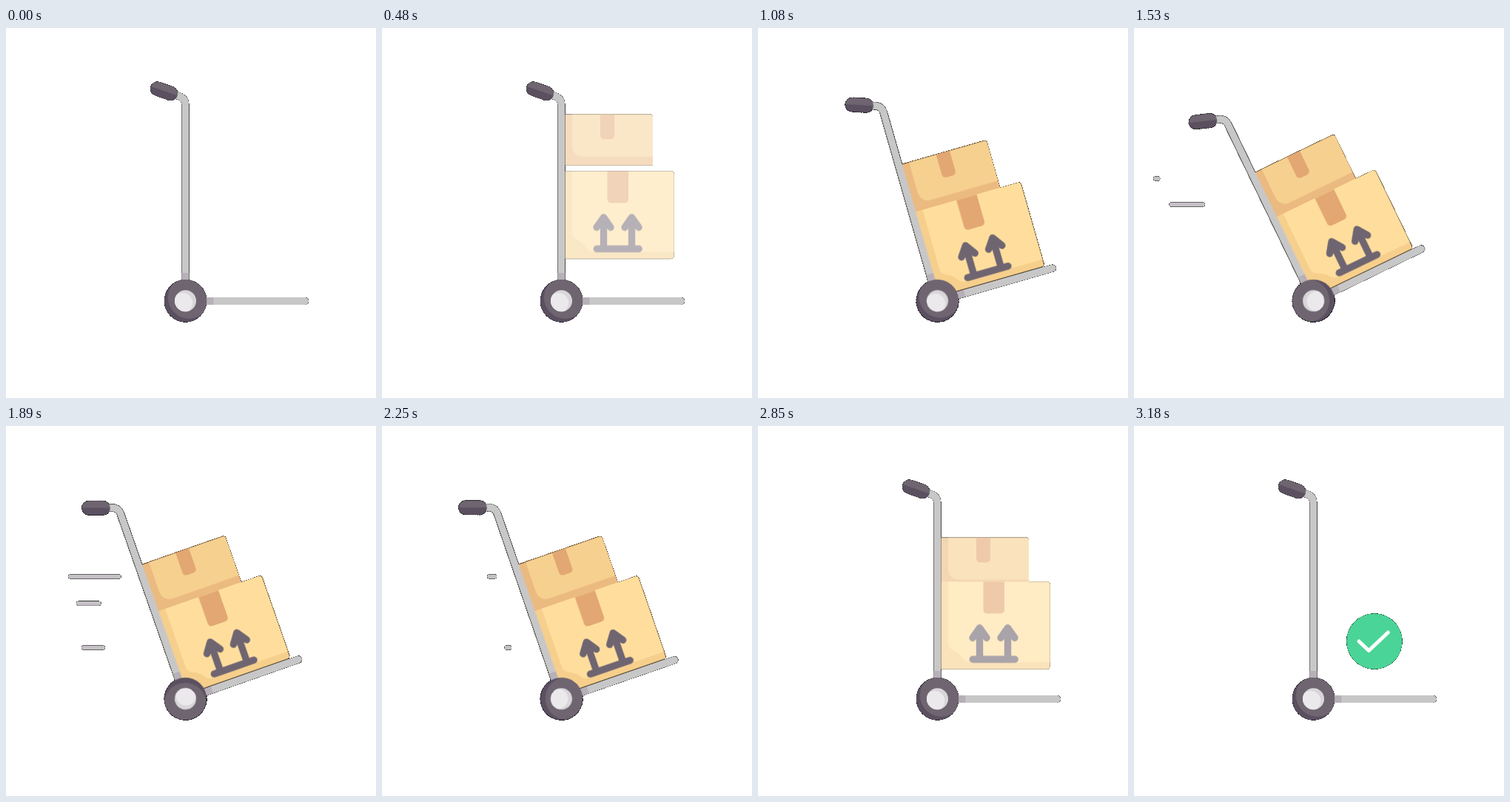
Write an HTML page that moves like this. It is 500 by 500 pixels and loops after 3.63 s.

```html
<!DOCTYPE html>
<html lang="en">
<head>
<meta charset="utf-8">
<title>Hand truck delivery</title>
<style>
  html, body { margin: 0; width: 100%; height: 100%; overflow: hidden; background: #fff; }
  svg { display: block; width: 100vw; height: 100vh; }

  .tilt, .spin, .fade, .drop, .wind rect, .done {
    animation: 3630ms linear infinite both;
  }
  .tilt, .spin { transform-origin: 242.5px 368.7px; }
  .tilt { animation-name: tilt; }
  .spin { animation-name: spin; }
  .fade { animation-name: fade; }
  .drop { animation-name: drop; --rest: 1.8px; }
  .late { animation-delay: 25ms; --rest: 3.6px; }
  .done { animation-name: pop; transform-origin: 324.9px 291px; }
  .rim { filter: url(#rim); }
  .edge { filter: url(#edge); }

  .metal { fill: none; stroke: #c8c7c8; stroke-width: 9.9; }
  .shade { stroke: #b7b0b8; }
  .grey { fill: #6f6571; }
  .dark { fill: #5a5060; }
  .arrows { fill: none; stroke: #6f6571; stroke-width: 9.4; stroke-linecap: round; stroke-linejoin: round; }
  .tape { fill: #e2a772; }
  .wind rect { fill: #c5c1c6; height: 6px; rx: 2.4px; }
  .w1 { y: 200.5px; }
  .w3 { y: 296.6px; }
  .wind .w1 { animation-name: w1; }
  .wind .w2 { animation-name: w2; }
  .wind .w3 { animation-name: w3; }

  @keyframes tilt {
    0%, 22.73% { transform: rotate(0deg); }
    29.75% { transform: rotate(-15.9deg); }
    33.88% { transform: rotate(-22deg); animation-timing-function: ease-out; }
    42.15% { transform: rotate(-25.8deg); animation-timing-function: ease-in-out; }
    52.07% { transform: rotate(-19.3deg); }
    64.74% { transform: rotate(-19deg); }
    72.64%, 100% { transform: rotate(0deg); }
  }
  @keyframes spin {
    0%, 30.99% { transform: rotate(0deg); }
    67.77%, 100% { transform: rotate(-360deg); }
  }
  @keyframes drop {
    0%, 9.09% { transform: translateY(-115px); animation-timing-function: cubic-bezier(.5, 1, .89, 1); }
    21.4% { transform: translateY(var(--rest)); }
    72.7% { transform: translateY(var(--rest)); animation-timing-function: cubic-bezier(.11, 0, .5, 0); }
    83.47%, 100% { transform: translateY(-115px); }
  }
  @keyframes fade {
    0%, 9.09% { opacity: 0; }
    17.36%, 75.2% { opacity: 1; }
    83.47%, 100% { opacity: 0; }
  }
  @keyframes w1 {
    0%, 41.4% { x: 26px; width: 0; }
    42.15% { x: 26px; width: 9px; }
    52.07% { x: 84px; width: 71.5px; }
    64.2%, 100% { x: 155px; width: 0; }
  }
  @keyframes w2 {
    0%, 38.3% { x: 47.5px; y: 235.4px; width: 0; }
    42.15% { x: 47.5px; y: 235.4px; width: 48px; }
    44.6% { x: 59px; y: 235.7px; width: 69px; }
    52.07% { x: 95px; y: 236.8px; width: 33.5px; }
    58.9%, 100% { x: 128px; y: 236.8px; width: 0; }
  }
  @keyframes w3 {
    0%, 49.5% { x: 102px; width: 0; }
    52.07% { x: 102px; width: 31.5px; }
    55.5% { x: 121px; width: 54px; }
    63.4%, 100% { x: 175px; width: 0; }
  }
  @keyframes pop {
    0%, 83.47% { transform: scale(0); }
    87.6%, 100% { transform: scale(1); }
  }
</style>
</head>
<body>
<svg viewBox="0 0 500 500">
  <defs>
    <!-- dark rim on the soft edge pixels: alone, or with the shape on top -->
    <filter id="rim" filterUnits="userSpaceOnUse" x="0" y="0" width="500" height="500" color-interpolation-filters="sRGB">
      <feComponentTransfer in="SourceAlpha">
        <feFuncA type="linear" slope="20" intercept="-4"/>
      </feComponentTransfer>
    </filter>
    <filter id="edge" filterUnits="userSpaceOnUse" x="0" y="0" width="500" height="500" color-interpolation-filters="sRGB">
      <feComponentTransfer in="SourceAlpha" result="rim">
        <feFuncA type="linear" slope="20" intercept="-4"/>
      </feComponentTransfer>
      <feMerge>
        <feMergeNode in="rim"/>
        <feMergeNode in="SourceGraphic"/>
      </feMerge>
    </filter>
    <clipPath id="tyre"><circle cx="242.5" cy="368.7" r="28.7"/></clipPath>
    <clipPath id="hub"><circle cx="242.5" cy="368.7" r="14.5"/></clipPath>
  </defs>

  <g class="edge wind">
    <rect class="w1"/>
    <rect class="w2"/>
    <rect class="w3"/>
  </g>

  <g class="rim">
    <g class="tilt"><use href="#cart"/></g>
  </g>

  <g class="edge fade">
    <g class="tilt">
      <g class="drop late">
        <path fill="#ebba80" d="M244 174.5H362a4 4 0 0 1 4 4V243.5H244z"/>
        <path fill="#f6d08f" d="M257 174.5H362a4 4 0 0 1 4 4V231.5H271a14 14 0 0 1-14-14z"/>
        <path class="tape" d="M295 174.5h19v28.5a5 5 0 0 1-5 5h-9a5 5 0 0 1-5-5z"/>
      </g>
      <g class="drop">
        <path fill="#f6cf8c" d="M244 243H390.5a4 4 0 0 1 4 4V357.5a4 4 0 0 1-4 4H244z"/>
        <path fill="#ffde9d" d="M257 243H390.5a4 4 0 0 1 4 4V352H285q-5 0-8-5t-8-8l-7-4q-5-3-5-9z"/>
        <path class="tape" d="M304.5 243.3h28.5v37.7a5 5 0 0 1-5 5h-18.5a5 5 0 0 1-5-5z"/>
        <path class="arrows" d="M290.2 348H347.2M299.5 348V307M290 319l9.5-13.5 9.5 13.5M337.5 348V307M328 319l9.5-13.5 9.5 13.5"/>
      </g>
    </g>
  </g>

  <g class="tilt">
    <g id="cart">
      <path class="metal" d="M226 89.5L234 92.2Q242.4 95 242.4 104V345"/>
      <path class="metal shade" d="M242.4 331V345"/>
      <path class="metal" stroke-linecap="round" d="M266 369H404.1"/>
      <path class="metal shade" d="M266 369H280.5"/>

      <g transform="translate(213.6 85.2) rotate(19.3)">
        <rect class="grey" x="-19.2" y="-9.6" width="38.4" height="19.2" rx="9.6"/>
        <path class="dark" d="M-19.2 0H19.2A9.6 9.6 0 0 1 9.6 9.6H-9.6A9.6 9.6 0 0 1-19.2 0z"/>
      </g>

      <g class="spin">
        <circle class="dark" cx="242.5" cy="368.7" r="28.7"/>
        <circle class="grey" cx="247.5" cy="364.2" r="28.5" clip-path="url(#tyre)"/>
        <circle fill="#d9d6da" cx="242.5" cy="368.7" r="14.5"/>
        <circle fill="#ebe9eb" cx="238.8" cy="371.5" r="13.5" clip-path="url(#hub)"/>
      </g>
    </g>
  </g>

  <g class="edge">
    <g class="done">
      <circle fill="#4bd497" cx="324.9" cy="291" r="37.7"/>
      <path fill="none" stroke="#fff" stroke-width="5" stroke-linecap="round" stroke-linejoin="round" d="M304 291L317.3 303.5L343.3 279"/>
    </g>
  </g>
</svg>
</body>
</html>
```
